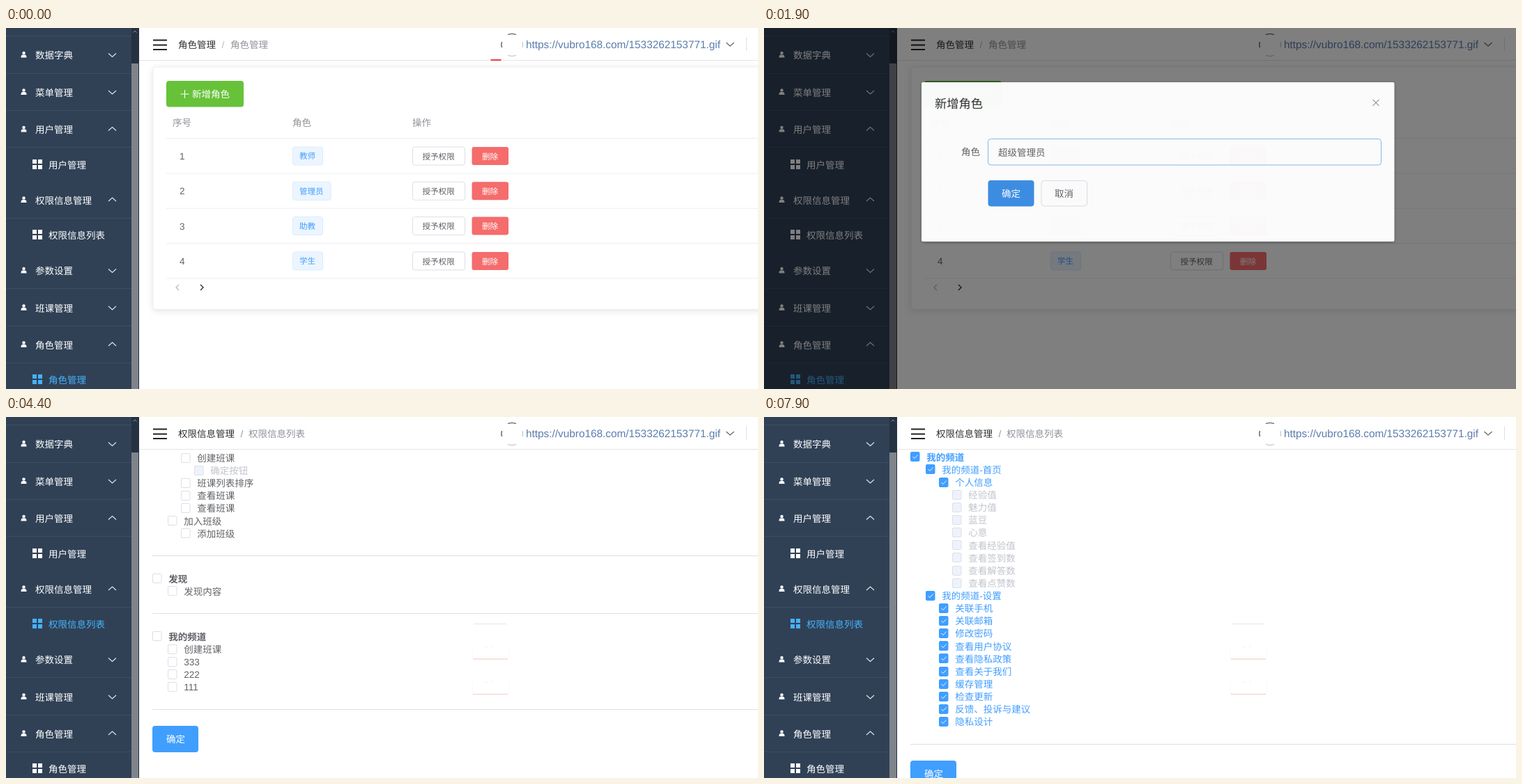
Write an HTML page that moves like this. It is 1079x519 px and loops after 8 s.

```html
<!DOCTYPE html>
<html lang="zh-CN">
<head>
<meta charset="utf-8">
<style>
html, body { margin: 0; width: 100%; height: 100%; overflow: hidden; background: #fff; }
svg { display: block; font-family: "Liberation Sans", "Noto Sans CJK SC", sans-serif; text-rendering: geometricPrecision; }
path { fill: none; }
text { white-space: pre; }
.row rect { fill: #fff; stroke: #dcdfe6; }
.row text { fill: #606266; }
.row path { stroke: none; }
.off rect { fill: #edf2fc; }
.off text { fill: #c0c4cc; }
.hover rect { stroke: #409eff; }
.on rect { fill: #409eff; stroke: #409eff; }
.on text { fill: #409eff; }
.on path { stroke: #fff; }
.lit rect { fill: #ecf5ff; stroke: #c6e2ff; }
.lit text { fill: #409eff; }
</style>
</head>
<body>
<svg id="stage" width="1079" height="519" viewBox="0 0 1079 519"></svg>
<script>
const BLUE = '#409eff', DARK = '#303133', GREY = '#909399', BODY = '#606266', LINE = '#ebeef5';

// Text is placed by its left edge and vertical middle.
const text = (x, y, s, fill = BODY, size = 13.5, attrs = '') =>
  `<text x="${x}" y="${y + size * 0.37}" font-size="${size}" fill="${fill}" ${attrs}>${s}</text>`;
const box = (x, y, w, h, fill, stroke = 'none', r = 3, attrs = '') =>
  `<rect x="${x}" y="${y}" width="${w}" height="${h}" rx="${r}" fill="${fill}" stroke="${stroke}" ${attrs}/>`;
const path = (d, stroke, w = 1, attrs = '') => `<path d="${d}" stroke="${stroke}" stroke-width="${w}" ${attrs}/>`;
const group = (id, body, attrs = '') => `<g id="${id}" ${attrs}>${body}</g>`;
const chevron = (x, y, dir, stroke) => path(`M${x - 5.5} ${y - 2.5 * dir}l5.5 ${5 * dir}l5.5 ${-5 * dir}`, stroke, 1.1);

function sidebar() {
  const item = (y, name, dir) =>
    `<circle cx="25.5" cy="${y - 3}" r="2.2" fill="#fff"/>` +
    `<path d="M21.5 ${y + 3.5}q0 -4 2.5 -4h3q2.5 0 2.5 4z" style="fill:#fff"/>` +
    text(42, y + 0.5, name, '#fff') + chevron(152.5, dir > 0 ? y : y - 1, dir, '#e3e6ea');
  const sub = (y, name, id) => group(id,
    [38, 46].map(x => [-8, 0].map(dy => box(x, y + dy, 6, 6, 'inherit', 'none', 0)).join('')).join('')
      .replaceAll('fill="inherit"', '') + text(61, y + 0.5, name, '').replace('fill=""', ''), 'fill="#fff"');
  const rules = [11.5, 65.5, 118.5, 171.5, 273.5, 374.5, 428.5, 481.5];
  return box(0, 0, 180, 519, '#304156', 'none', 0) +
    box(180, 0, 11, 519, '#263141', 'none', 0) +
    box(180, 51, 10, 468, '#7f848b', 'none', 0) +
    path('M182.5 6.5l2.5 -2.5l2.5 2.5', '#8a93a0') +
    path(rules.map(y => `M0 ${y}h180`).join(''), '#3d4d62') +
    item(39, '数据字典', 1) + item(92.5, '菜单管理', 1) + item(146, '用户管理', -1) +
    sub(197, '用户管理', 'users') + item(247.5, '权限信息管理', -1) + sub(298, '权限信息列表', 'rights') +
    item(349, '参数设置', 1) + item(402.5, '班课管理', 1) + item(455.5, '角色管理', -1) +
    sub(506, '角色管理', 'roles');
}

function header() {
  return box(191, 0, 888, 46, '#fff', 'none', 0) + path('M191 46.5h888', '#e6e6e6') +
    path('M211 17.5h20M211 24.5h20M211 31h20', '#222', 1.8) +
    group('crumbOld', text(247, 24, '角色管理', DARK) + text(309.5, 24, '/', '#b4b8bf') + text(322, 24, '角色管理', GREY)) +
    group('crumbOut', text(0, 24, '角色管理', DARK) + text(62, 24, '/', GREY)) +
    group('crumbNew', text(247, 24, '权限信息管理', DARK) + text(336.5, 24, '/', GREY) + text(348, 24, '权限信息列表', GREY)) +
    path('M720 9.5q6 -2 12 0M711.5 20q-1.5 4 0 8', '#444', 1.2) +
    path('M720 39.5q6 2 12 0M741 20q1.5 4 0 8', '#bbb') +
    text(746, 23, 'https://vubro168.com/1533262153771.gif', '#5b7dae', 15.35) +
    chevron(1039, 23.5, 1, '#5a5e66') + path('M1062.5 13v20', '#dcdfe6') +
    group('redLine', path('M695.5 46h15', '#e8403a', 2));
}

function table() {
  const pitch = 50.3;
  const row = (name, i) => {
    const y = 184 + i * pitch, w = 21 + 11.5 * name.length;
    return `<g ${i == 4 ? 'id="newRow"' : ''}>` + text(249, y, i + 1) +
      box(411.5, y - 13, w - 1, 26, '#ecf5ff', '#d9ecff') + text(421, y, name, BLUE, 11.55) +
      group('grant' + i, box(583.5, y - 13, 75, 26, '#fff', '#dcdfe6') + text(597.5, y + 0.5, '授予权限', BODY, 11.55)) +
      box(668.5, y - 13, 52.5, 26, '#f56c6c') + text(683, y + 0.5, '删除', '#fff', 11.55) +
      path(`M230 ${y + 25}h849`, LINE) + '</g>';
  };
  return box(211, 56, 900, 348.5, '#fff', LINE, 4, 'id="card" style="filter:drop-shadow(0 2px 5px rgba(0,0,0,.1))"') +
    box(230, 76, 111, 37.5, '#67c23a', 'none', 4, 'id="add"') +
    path('M250.5 95h12M256.5 89v12', '#fff', 1.1) + text(267, 95.5, '新增角色', '#fff') +
    text(239, 136.5, '序号', GREY) + text(411, 136.5, '角色', GREY) + text(583, 136.5, '操作', GREY) +
    path('M230 158.5h849', LINE) +
    ['教师', '管理员', '助教', '学生', '超级管理员'].map(row).join('') +
    group('pager', path('M248 369l-4 4l4 4', '#b4b8bf', 1.2) + path('M279 369l4 4l-4 4', DARK, 1.4));
}

// Rows read as depth, optional + (checked) / - (disabled) / * (toggled later), label.
function tree(list, y) {
  const left = [210.5, 232.5, 251.5, 270.5], pitch = 18.13;
  const rule = y => path(`M210 ${Math.round(y) + 0.5}h869`, '#dcdee2');
  const rows = list.split(' ').map((entry, i) => {
    const [, depth, mark, name] = entry.match(/(\d)([+*-]?)(.*)/);
    const x = left[depth], top = depth == 0;
    let out = '';
    if (i) {
      if (top) out = rule(y + 32);
      y += top ? 65 : pitch;
    }
    const cls = { '+': ' on', '-': ' off' }[mark] || '', mid = Math.round(y);
    return out + `<g class="row${cls}" ${mark == '*' ? 'id="toggle"' : ''}>` +
      box(x, mid - 6.5, 12.5, 13, '', '', 1.5) + path(`M${x + 3} ${mid}l2.5 2.5l4.5 -5`, '', 0.9) +
      text(x + 22.8, y + 0.3, name, '', 13.5, top ? 'font-weight="bold"' : '') + '</g>';
  });
  return rows.join('') + rule(y + 32) +
    box(210, Math.round(y + 56), 66, 38, BLUE, 'none', 4) + text(230, y + 75, '确定', '#fff');
}

const plainTree = '0班课频道 1班课管理 2创建班课 3-确定按钮 2班课列表排序 2查看班课 2查看班课 1加入班级 2添加班级 ' +
  '0发现 1发现内容 0我的频道 1创建班课 1333 1222 1111';
const checkedTree = '0+班课频道 1+班课频道-首页 2+创建班课 1+班课详情-消息 1+班课详情-详情 2+信息列表 2+修改信息列表 ' +
  '2+结束班课 2+删除班课 2+编辑班课信息 2退出班课 1+班课详情-资源 1*班课信息 2搜索班课 2排序 ' +
  '0+发现 1+发现-首页 2+扫码加入班课 1+发现-课程圈 1+发现-社区 ' +
  '0+我的频道 1+我的频道-首页 2+个人信息 3-经验值 3-魅力值 3-蓝豆 3-心意 3-查看经验值 3-查看签到数 3-查看解答数 3-查看点赞数 ' +
  '1+我的频道-设置 2+关联手机 2+关联邮箱 2+修改密码 2+查看用户协议 2+查看隐私政策 2+查看关于我们 2+缓存管理 2+检查更新 ' +
  '2+反馈、投诉与建议 2+隐私设计';

// Faint leftovers of the table buttons
const traces = path('M671 297.5h47', '#e9e6e6') +
  [348, 398.5].map(y => path(`M669 ${y - 17}v14q0 3 3 3h46q3 0 3 -3v-14`, '#f8f8f8') +
    path(`M670 ${y}h50`, '#f3c9c2') + path(`M688 ${y - 17.5}h3M697 ${y - 17.5}h2`, '#eee')).join('');

const dialog = box(226, 78, 678.5, 229, '#fff', 'none', 2, 'style="filter:drop-shadow(0 1px 2px rgba(0,0,0,.3))"') +
  text(245, 109, '新增角色', DARK, 17.3) + path('M873.5 103l9 9m0 -9l-9 9', GREY, 1.1) +
  text(283, 178.5, '角色') + box(321.5, 159.5, 564, 37.5, '#fff', '#dcdfe6', 4, 'id="field"') +
  group('typed', text(336, 179, '超级管理员')) +
  box(321.5, 219, 66, 37.5, BLUE, 'none', 4, 'id="ok"') + text(341, 238, '确定', '#fff') +
  box(398, 219.5, 65.5, 36.5, '#fff', '#dcdfe6', 4) + text(417, 238, '取消');

const stage = document.getElementById('stage');
stage.innerHTML = box(0, 0, 1079, 519, '#fff', 'none', 0) + group('table', table()) +
  group('trees', tree(plainTree, 65.3) + tree(checkedTree, 575)) + group('traces', traces) +
  header() + sidebar() + box(0, 0, 1079, 519, '#000', 'none', 0, 'id="mask"') + group('dialog', dialog);

const el = id => document.getElementById(id);
const set = (id, name, value) => el(id).setAttribute(name, value);
const show = (id, on) => set(id, 'opacity', +on);
const ramp = (t, from, to) => Math.min(1, Math.max(0, (t - from) / (to - from)));
const mix = k => `rgb(${[70, 178, 252].map(c => Math.round(255 + (c - 255) * k))})`;

const scrollKeys = [[4300, 0], [4700, 170], [5100, 170], [5600, 582], [5800, 602],
  [5900, 602], [6400, 623], [7300, 623], [7900, 974]];
const scrollAt = t => Math.round(scrollKeys.reduce((y, [time, value], i) => {
  if (!i) return value;
  const [start, from] = scrollKeys[i - 1];
  return t > start ? from + (value - from) * ramp(t, start, time) : y;
}, 0));

function render(t) {
  const closing = t >= 1900, added = t >= 2200, rights = t >= 2900;
  show('redLine', t < 100);

  set('add', 'fill', t >= 400 && t < 900 ? '#85ce61' : '#67c23a');
  show('newRow', added);
  set('card', 'height', added ? 398.8 : 348.5);
  set('pager', 'transform', `translate(0 ${added ? 50.3 : 0})`);
  set('grant0', 'class', t >= 2400 ? 'lit' : '');
  show('table', !rights);

  const open = closing ? 1 - ramp(t, 1890, 2190) : ramp(t, 400, 900);
  set('mask', 'opacity', 0.5 * (closing ? 1 - ramp(t, 1900, 2200) : ramp(t, 400, 700)));
  set('dialog', 'opacity', open);
  set('dialog', 'transform', `translate(0 ${0.6 - 19 * (1 - open)})`);
  set('field', 'stroke', t < 1100 ? '#dcdfe6' : closing ? '#8ab8ea' : BLUE);
  show('typed', t >= 1500);
  set('ok', 'fill', closing ? '#3a8ee6' : t >= 1600 ? '#66b1ff' : BLUE);

  const swap = ramp(t, 2950, 3400), tint = ramp(t, 2850, 3150);
  show('crumbOld', t < 3000);
  set('crumbOut', 'opacity', t < 3000 ? 0 : 1 - swap);
  set('crumbOut', 'transform', `translate(${430 + 20 * swap} 0)`);
  set('crumbNew', 'opacity', swap);
  set('crumbNew', 'transform', `translate(${20 * (1 - swap)} 0)`);
  set('rights', 'fill', mix(tint));
  set('roles', 'fill', mix(1 - tint));

  show('trees', rights);
  show('traces', rights);
  set('trees', 'transform', `translate(0 ${-scrollAt(t)})`);
  set('toggle', 'class', 'row' + (t >= 6900 ? ' on' : t >= 6700 ? ' hover' : ''));
}

// The picture changes ten times a second.
const begin = performance.now();
function tick() {
  render(Math.floor((performance.now() - begin) % 8000 / 100) * 100);
  requestAnimationFrame(tick);
}
tick();
</script>
</body>
</html>
```
